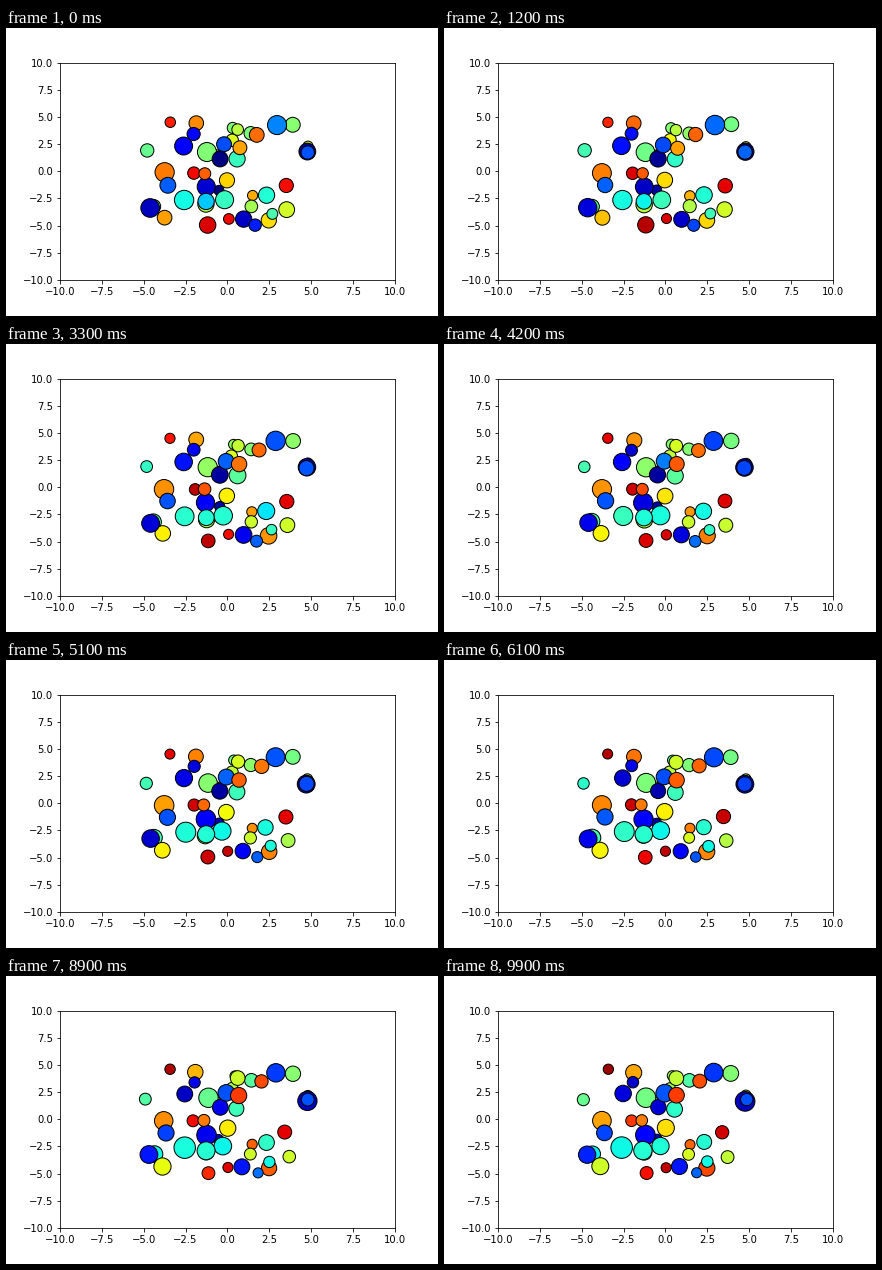
These frames come from a looping animation (432 by 288 pixels, 10 s). A matplotlib script:

```python
import numpy as np
import matplotlib.pyplot as plt
from matplotlib.animation import FuncAnimation

FRAMES, INTERVAL = 100, 100
plt.rcParams["font.family"] = "DejaVu Sans"

# Dots by colormap tone, back to front: centre and radius in pixels.
DOTS = {
    .76: [(190, 96, 7.5), (158, 145, 9.5), (263, 192, 8), (246, 168, 5)],
    .43: [(148, 178, 8), (140, 123, 6), (231, 132, 8)],
    .50: [(210, 127, 5.5), (202, 123, 9.5), (228, 100, 5), (245, 105, 6.5),
          (287, 97, 7.5)],
    .59: [(302, 119, 5), (200, 176, 8), (226, 112, 6), (232, 102, 6.5),
          (282, 181, 7), (245, 178, 6)],
    .66: [(221, 152, 8), (157, 190, 8)],
    .92: [(164, 94, 5), (188, 145, 6), (202, 197, 7), (222, 191, 5),
          (280, 157, 7)],
    .04: [(213, 163, 5), (214, 131, 8), (301, 124, 9)],
    .10: [(188, 106, 6), (178, 118, 8.5), (200, 159, 9.5), (144, 179, 9),
          (237, 191, 8)],
    .21: [(270, 97, 9.5), (161, 157, 8), (220, 117, 8), (301, 124, 7),
          (251, 197, 5.5)],
    .39: [(217, 171, 9), (200, 174, 8.5), (179, 172, 10), (265, 186, 5.5),
          (260, 167, 8)],
    .80: [(233, 120, 7.5), (254, 106, 7), (198, 145, 6)],
}

rng = np.random.default_rng(7)


def walk(step, *shape):
    """Random walk of uniform steps, centred on zero."""
    w = np.cumsum(step * (rng.random((FRAMES, *shape)) - .5), axis=0)
    return w - w.mean(axis=0)


px, py, radius, tone = np.array(
    [(*dot, c) for c, group in DOTS.items() for dot in group]).T
n = len(px)

weight = ((4 * radius**2 - 100) / 300) ** (2 / 3)
pos = np.c_[(px - 221.4) / 16.74, (143.28 - py) / 10.872] + walk(.03, n, 2)
sizes = 300 * abs(weight + walk(.05, n)) ** 1.5 + 100
tones = tone + walk(.02, n)

fig, ax = plt.subplots(figsize=(6, 4), dpi=72)
fig.subplots_adjust(left=.125, right=.9, bottom=.125, top=.88)
dots = ax.scatter(*pos[0].T, s=sizes[0], c=tones[0], vmin=0, vmax=1,
                  cmap="jet", edgecolor="k")
ax.axis([-10, 10, -10, 10])


def update(i):
    dots.set_offsets(pos[i])
    dots.set_sizes(sizes[i])
    dots.set_array(tones[i])
    return dots,


anim = FuncAnimation(fig, update, frames=FRAMES, interval=INTERVAL, repeat=True)
plt.show()
```
